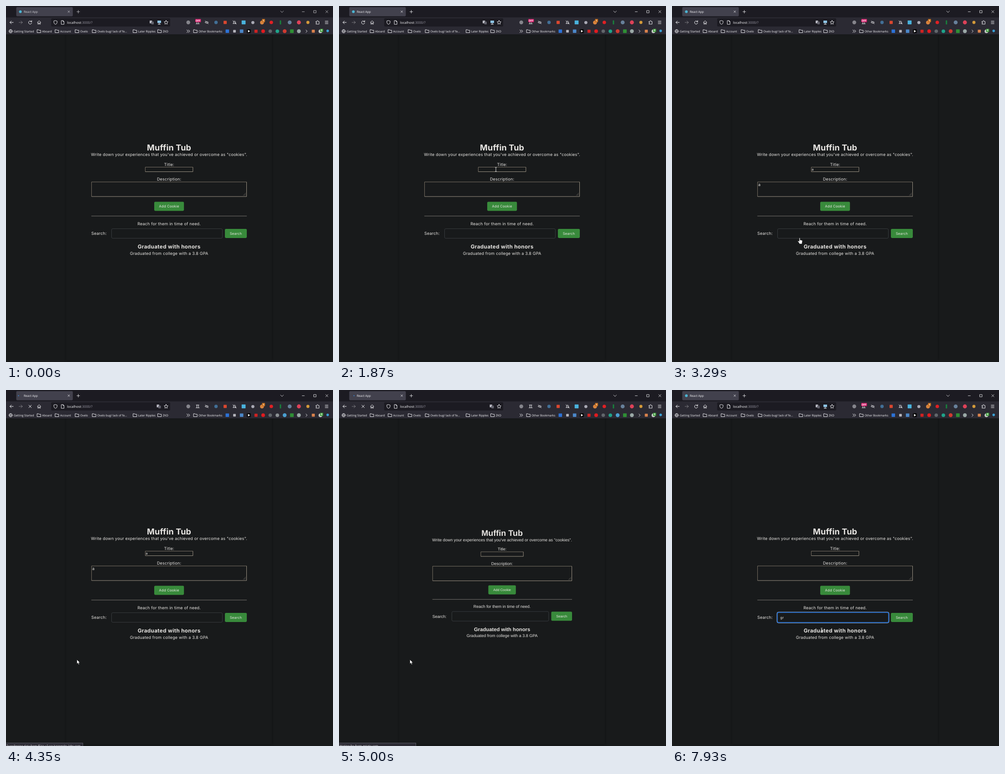
Recreate the animation shown at these times as an HTML page. Size 717 by 781 pixels, loop 7.99 s.

```html
<!DOCTYPE html>
<html lang="en">
<head>
<meta charset="utf-8">
<title>React App</title>
<style>
  html, body { margin: 0; width: 100%; height: 100%; overflow: hidden; background: #181a1b; }
  svg { display: block; width: 717px; height: 781px; }
  text { text-rendering: geometricPrecision; white-space: pre; }
  .ui { font-family: "Open Sans", "Noto Sans", sans-serif; font-size: 6.3px; fill: #fbfbfe; }
  .line { fill: none; stroke: #fbfbfe; stroke-linecap: round; stroke-linejoin: round; }
  .wide { font-family: Inter, sans-serif; letter-spacing: .02em; }
  .plain { font-family: "Liberation Sans", Arial, sans-serif; }
  .form { font-size: 9px; fill: #e8e6e3; }
</style>
</head>
<body>
<svg id="stage" viewBox="0 0 717 781">
  <defs>
    <filter id="soft" x="-10%" y="-10%" width="120%" height="120%"><feGaussianBlur stdDeviation="2.5"/></filter>
  </defs>
  <rect width="717" height="781" fill="#181a1b"/>
  <rect x="132" y="40" width="451" height="737" fill="#0e1011" opacity=".4" filter="url(#soft)"/>
  <rect x="132" y="40" width="451" height="737" fill="#181a1b"/>
  <g id="page"></g>
  <g id="chrome" class="ui">
    <rect width="717" height="25" fill="#1c1b22"/>
    <rect y="25" width="717" height="38" fill="#2b2a33"/>
    <rect y="62.5" width="717" height=".7" fill="#0c0c0d"/>
    <rect x="22.5" y="2.5" width="124" height="20" rx="2.2" fill="#42414d"/>
    <rect x="99" y="27" width="261" height="18" rx="2.2" fill="#1c1b22"/>
    <g id="titlebar">
      <text x="39" y="15" font-size="6.6">React App</text>
      <path class="line" stroke-width=".8" d="M135.8 10.6l3.6 3.6m0-3.6l-3.6 3.6M155.3 12.6h6.4m-3.2-3.2v6.4M602 11l3.2 3.2 3.2-3.2M649.3 12.6h5M675 10h5v5h-5zM701 10l5 5m0-5l-5 5"/>
    </g>
    <circle id="favicon" cx="31.5" cy="12.5" r="3" fill="#4cb4d2"/>
    <circle id="throbber" cy="12.5" r="1.1" fill="#3a8ee6"/>
    <path class="line" d="M16 36H8.6m3.2-3.2L8.6 36l3.2 3.2"/>
    <path class="line" opacity=".38" d="M28.5 36h7.4m-3.2-3.2l3.2 3.2-3.2 3.2"/>
    <path id="reload" class="line" d="M55.8 34.2a3.5 3.5 0 1 0 .6 2.8M56.4 32v2.6h-2.6"/>
    <path id="stop" class="line" d="M50 33.2l5.6 5.6m0-5.6L50 38.8"/>
    <path class="line" stroke-width=".9" d="M68.8 36l3.8-3.7 3.8 3.7M69.9 35.3v4.5h1.8v-2.4h1.8v2.4h1.8v-4.5"/>
    <path class="line" stroke-width=".9" d="M108.5 32l3.6 1.2v2.6q0 3-3.6 4.6-3.6-1.6-3.6-4.6v-2.6zM121.6 32h3.4l2.2 2.2v6h-5.6zM125 32v2.2h2.2"/>
    <text x="134" y="38.7" font-size="7.4">localhost<tspan fill="#9a99a5">:3000/?</tspan></text>
    <g id="translate">
      <rect x="315" y="32" width="5.4" height="6" rx=".6" fill="#b9b9c2"/>
      <rect x="318.6" y="34.2" width="5.4" height="6" rx=".6" fill="#63636e"/>
    </g>
    <g id="monitor">
      <rect x="332" y="32" width="8" height="5.4" fill="#8cc4e6"/>
      <path class="line" d="M336 37.5v2.2m-2.6.4h5.2"/>
    </g>
    <path class="line" stroke-width=".9" d="M351 31.6l1.3 2.8 3 .4-2.2 2.1.5 3-2.6-1.4-2.6 1.4.5-3-2.2-2.1 3-.4z"/>
    <circle cx="10.2" cy="55.3" r="3.7" class="line" stroke-width=".8"/>
    <path class="line" stroke-width=".7" d="M6.5 55.3h7.4M10.2 51.6q-3.4 3.7 0 7.4 3.4-3.7 0-7.4"/>
    <text x="17" y="57.7">Getting Started</text>
    <path class="line" d="M396.5 52.4l2.9 2.9-2.9 2.9m3.5-5.8l2.9 2.9-2.9 2.9"/>
  </g>
  <g id="status" class="ui">
    <rect x="-1" y="774.5" width="169.5" height="9" fill="#2b2a33" stroke="#5b5b66"/>
    <text id="statusText" x="1" y="782.5" font-size="6.4"></text>
  </g>
  <g id="cursor">
    <path id="arrow" d="M0 0v9.2l2.1-2 1.5 3.5 1.6-.7-1.5-3.3h2.9z" fill="#fff" stroke="#000" stroke-width=".5"/>
    <path id="ibeam" d="M-2-4.6h1.4L0-4l.6-.6H2M0-4v8M-2 4.6h1.4L0 4l.6.6H2" fill="none" stroke="#f2f2f2" stroke-width=".9"/>
    <path id="hand" d="M-.9 0Q0-1 .9 0v4.3l4 .9q1.2.4 1.1 1.8l-.8 4v2H-.8v-1.5l-3.1-4q-.4-1.5 1.2-1.2l1.8 1.3z" fill="#fff" stroke="#000" stroke-width=".5"/>
  </g>
</svg>
<script>
const LOOP = 7990;
const $ = id => document.getElementById(id);
const add = (parent, tag, attrs, text) => {
  const node = document.createElementNS("http://www.w3.org/2000/svg", tag);
  for (const key in attrs) node.setAttribute(key, attrs[key]);
  if (text) node.textContent = text;
  return parent.appendChild(node);
};
const show = (node, on) => node.setAttribute("visibility", on ? "visible" : "hidden");
const chrome = $("chrome");

// Bookmark folders
[[68, "Aboard"], [107.5, "Account"], [151.5, "Ovelo"], [189, "Ovelo bug/ lack of fe..."],
 [278.5, "Later Ripples"], [332.5, "ZKD"], [411, "Other Bookmarks"]].forEach(([x, name]) => {
  add(chrome, "path", { class: "line", "stroke-width": .9,
    d: `M${x + .5} 52h2.8l1 1.2h3.9v5.3h-7.7z` });
  add(chrome, "text", { x: x + 11.2, y: 57.7 }, name);
});

// Toolbar buttons: plain discs and squares
const disc = (cx, cy, r, fill) => add(chrome, "circle", { cx, cy, r, fill });
const square = (cx, cy, s, fill) =>
  add(chrome, "rect", { x: cx - s / 2, y: cy - s / 2, width: s, height: s, rx: .8, fill });
const glyph = d => add(chrome, "path", { class: "line", "stroke-width": .9, d });
const badge = (x, y, w, fill, text) => {
  const g = add(chrome, "g", {});
  add(g, "rect", { x, y, width: w, height: 7, rx: 1, fill });
  add(g, "text", { x: x + w / 2, y: y + 5.4, "font-size": 5.4, "font-weight": 700, "text-anchor": "middle" }, text);
  return g;
};
disc(399.7, 36, 4.2, "#85858c");
glyph("M417 33h6m-4.5 0v5.5m3.5-5.5v5.5M416.5 39h7.5");
glyph("M436.6 36q3.6-4 7.2 0-3.6 4-7.2 0M437 32.8l6.6 6.4");
disc(460.5, 36, 3.7, "#426f96");
square(480.5, 36, 7, "#d9472f");
glyph("M498 38.6h6.4l-1-1.6v-2q-2.2-4-4.4 0v2zM497.5 32.4l7.4 7.2");
square(521, 36, 8.6, "#4ab3dd");
disc(541.3, 36.3, 3.4, "#a9a9b4");
disc(561.3, 36.2, 4.3, "#d8843f");
disc(581.7, 36, 3.8, "#e02024");
add(chrome, "rect", { x: 600.3, y: 31.5, width: 3, height: 9, rx: 1, fill: "#18803c" });
disc(622, 36, 4.3, "#67809a");
disc(642.2, 36, 4.4, "#dd4158");
disc(662, 36, 3.4, "#d39a3a");
glyph("M679.8 34h2.1v-1.2q1.2-1.8 2.4 0V34h2.2v5.8h-6.7v-2h1.1q1.4-1 0-2h-1.1z");
glyph("M699.8 33.2h6.4m-6.4 2.8h6.4m-6.4 2.8h6.4");
const off = badge(415, 28.4, 12.4, "#d9206d", "OFF");
badge(561.3, 28.4, 6.6, "#c8701d", "1");

square(485.3, 55.3, 7.6, "#2c72d6");
square(501, 55.3, 5.8, "#b5b5bc");
square(516.6, 55.3, 7.6, "#4b87c9");
square(532.4, 55.3, 8.4, "#050505");
add(chrome, "path", { d: "M530.6 52.6l4.6 2.7-4.6 2.7z", fill: "#fff" });
square(548.2, 55.3, 6.8, "#cf2222");
disc(563.8, 55.3, 4, "#e01b1f");
disc(579.4, 55.3, 3.8, "#62666b");
const guard = disc(595, 55.3, 3.9, "");
const blocker = disc(611, 55.3, 4.2, "");
square(626.8, 55.3, 8, "#2f8f35");
disc(642.2, 55.3, 4.2, "#9aa8a6");
glyph("M657.6 52.6l2.8 2.7-2.8 2.7");
square(673.8, 55.3, 6.6, "#d8814c");
disc(689.4, 55.6, 4, "#c9cdc9");
badge(688.6, 50, 6.8, "#3d9a3a", "0");
disc(705.3, 54.6, 2.8, "#3a9fd4");

// Form in the web font or in the fallback font
function form(L) {
  const g = add($("page"), "g", { class: "form " + L.font });
  const mid = 357.6;
  const text = (x, y, s, more) => add(g, "text", { x, y, ...more }, s);
  const center = (y, s, more) => text(mid, y, s, { "text-anchor": "middle", ...more });
  const inset = (x, y, r, b) => {
    add(g, "path", { d: `M${x} ${b}V${y}H${r}`, fill: "none", stroke: "#7a7266" });
    add(g, "path", { d: `M${x} ${b}H${r}V${y}`, fill: "none", stroke: "#9c9384" });
  };
  const button = (x, y, r, s) => {
    add(g, "rect", { x, y, width: r - x, height: 20, rx: 2.4, fill: "#388a3b" });
    text((x + r) / 2, y + 12.7, s, { "text-anchor": "middle", "font-size": L.small });
  };
  const [head, intro, title, titleTop, desc, descTop, addTop, rule, reach, find, findTop, result, detail] = L.y;
  const { x, r } = L;
  center(head, "Muffin Tub", { "font-size": 18, "font-weight": 700 });
  center(intro, "Write down your experiences that you've achieved or overcome as \"cookies\".");
  center(title, "Title:");
  inset(mid - L.half, titleTop, mid + L.half, titleTop + 10);
  center(desc, "Description:");
  inset(x + .5, descTop, r - .5, descTop + 32);
  add(g, "path", { d: `M${r - 8} ${descTop + 30}l6-6m-3 6l3-3`, stroke: "#77736c", "stroke-width": .7 });
  button(mid - L.add, addTop, mid + L.add, "Add Cookie");
  add(g, "rect", { x, y: rule - .5, width: r - x, height: 1, fill: "#787570" });
  center(reach, "Reach for them in time of need.");
  text(x, find, "Search:");
  add(g, "rect", { x: L.box[0], y: findTop, width: L.box[1] - L.box[0], height: 21, rx: 2.6,
    fill: "#181a1b", stroke: "#3c4043", "stroke-width": .9 });
  button(L.box[1] + 5.6, findTop + .3, r, "Search");
  center(result, "Graduated with honors",
    { "font-size": L.sub, "font-weight": 700, "letter-spacing": L.gap });
  center(detail, "Graduated from college with a 3.8 GPA");
  return g;
}
const webForm = form({ font: "wide", x: 187.1, r: 528, half: 52.2, add: 32.6, box: [231.5, 474.4],
  small: 7.7, sub: 11.7, gap: ".03em",
  y: [316.5, 329.2, 350.6, 353.5, 383.2, 386, 429.4, 460.8, 480.6, 502.2, 488.6, 531.7, 545.7] });
const plainForm = form({ font: "plain", x: 204.8, r: 511, half: 46.6, add: 30.2, box: [247.5, 459.8],
  small: 7.5, sub: 11.25, gap: 0,
  y: [319.8, 332.1, 352.4, 355, 383.8, 386.6, 428.4, 459.3, 478.4, 499.6, 486, 528.7, 542.3] });

// Focus rings, typed text and carets
function field(x, y, w, h, tx, ty, size) {
  const g = add($("page"), "g", { class: "form wide" });
  const ring = add(g, "g", { fill: "none" });
  const outline = (gap, rx, stroke, width) => add(ring, "rect",
    { x: x - gap, y: y - gap, width: w + 2 * gap, height: h + 2 * gap, rx, stroke, "stroke-width": width });
  outline(1.6, 3.6, "#c9dcf6", .7);
  outline(.5, 2.8, "#1f74e4", 1.5);
  const text = add(g, "text", { x: tx, y: ty, "font-size": size });
  const caret = add(g, "rect", { y: ty - 7, width: .8, height: 9, fill: "#e8e6e3" });
  return (value, focus, blink) => {
    if (text.textContent !== value) text.textContent = value;
    caret.setAttribute("x", tx + (value ? text.getComputedTextLength() : 0));
    show(ring, focus);
    show(caret, focus && blink);
  };
}
const titleField = field(305.4, 353.5, 104.4, 10, 306.3, 361.3, 7.5);
const descField = field(187.6, 386, 339.9, 32, 189, 395, 9);
const searchField = field(231.5, 488.6, 242.9, 21, 237.3, 501.6, 7.6);

// Pointer path: time, x, y, shape
const path = [
  [70, 12, 423, "arrow"], [270, 120, 524, "arrow"], [870, 120, 524, "arrow"], [1460, 330, 372, "arrow"],
  [1530, 342, 362, "ibeam"], [1670, 342, 362, "ibeam"], [1820, 344, 358.5, "ibeam"], [2190, 344, 358.5, "ibeam"],
  [2340, 344, 397, "ibeam"], [2750, 344, 397, "ibeam"], [2880, 351, 432, "hand"], [2930, 352, 441, "hand"],
  [3080, 352, 441, "hand"], [3290, 280.5, 508.5, "hand"], [3460, 175, 580, "arrow"], [3560, 155.5, 591.5, "arrow"],
  [5530, 155.5, 591.5, "arrow"], [5800, 265, 514, "arrow"], [5860, 280, 504, "ibeam"], [5940, 286, 500, "ibeam"],
  [7730, 286, 500, "ibeam"], [7930, 328, 527, "ibeam"], [LOOP, 328, 527, "ibeam"]
];
function movePointer(t) {
  show($("cursor"), t >= path[0][0]);
  const i = Math.max(0, path.findIndex(p => p[0] > t) - 1);
  const [t0, x0, y0, shape] = path[i], [t1, x1, y1] = path[i + 1];
  const k = Math.max(0, (t - t0) / (t1 - t0));
  $("cursor").setAttribute("transform", `translate(${x0 + (x1 - x0) * k} ${y0 + (y1 - y0) * k})`);
  for (const id of ["arrow", "ibeam", "hand"]) $(id).setAttribute("display", id === shape ? "inline" : "none");
}

function draw(t) {
  const within = (a, b) => t >= a && t < b;
  const loading = within(3560, 5330);
  const fallback = within(4600, 5060);
  $("titlebar").setAttribute("opacity", t < 870 ? .8 : 1);
  show($("favicon"), !loading);
  show($("throbber"), loading);
  $("throbber").setAttribute("cx", 31 - 3.6 * Math.cos((t - 4350) / 156));
  show($("stop"), within(3560, 5530));
  show($("reload"), !within(3560, 5530));
  show($("monitor"), !loading);
  show(off, !loading);
  $("translate").setAttribute("transform", `translate(${loading ? 15.5 : 0} 0)`);
  guard.setAttribute("fill", within(3560, 4600) ? "#8b9093" : "#1fa389");
  blocker.setAttribute("fill", loading ? "#4a9fd0" : "#cf3a30");
  show($("status"), within(3640, 5200));
  $("statusText").textContent = t < 4600
    ? "Transferring data from ff.kis.v2.scr.kaspersky-labs.com…" : "Waiting for fonts.gstatic.com…";
  show(webForm, !fallback);
  show(plainForm, fallback);
  titleField(within(2120, 4600) ? "a" : "", within(1890, 2470), true);
  descField(within(2700, 4600) ? "a" : "", within(2470, 3080), true);
  searchField(t < 7060 ? "" : t < 7670 ? "g" : "gr", t >= 6210,
    within(6210, 6730) || within(7060, 7260) || within(7670, 7900));
  movePointer(t);
}

const start = performance.now();
(function tick() {
  draw((performance.now() - start) % LOOP);
  requestAnimationFrame(tick);
})();
</script>
</body>
</html>
```
